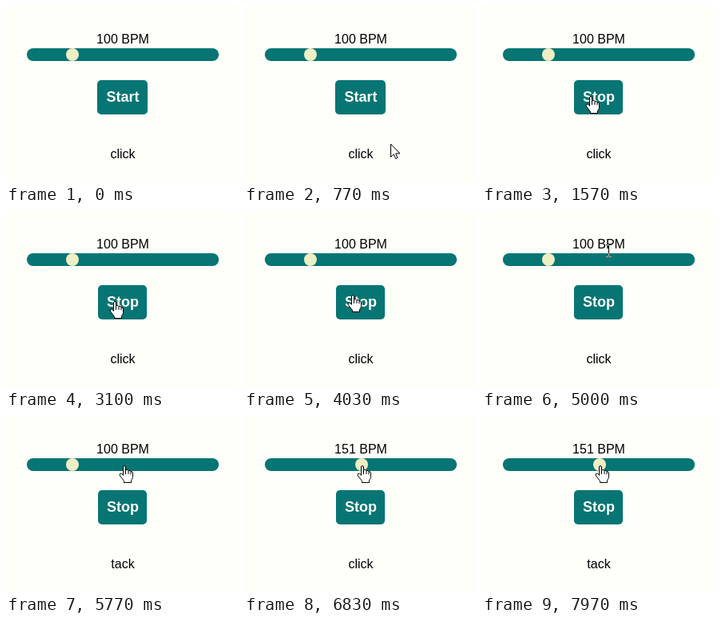
An HTML page that plays this animation: 290 px wide and 222 px high, repeating every 8000 ms.

```html
<!DOCTYPE html>
<html lang="en">
<head>
<meta charset="utf-8">
<title>Metronome</title>
<style>
  html, body { margin: 0; width: 100%; height: 100%; overflow: hidden; background: #fffffa; }
  svg { display: block; width: 290px; height: 222px; background: #fffffa; }
  text { font: 16px "Liberation Sans", Arial, sans-serif; text-anchor: middle; fill: #000; }
  #label { font-size: 18px; font-weight: bold; fill: #fff; }
  .teal { fill: #067573; }
  #thumb { fill: #f0eec4; }
  .pointer { fill: #fff; stroke: #000; stroke-linejoin: round; stroke-linecap: round; }
  #beam { fill: none; stroke: #fff; mix-blend-mode: difference; }
</style>
</head>
<body>
<svg viewBox="0 0 290 222">
  <text id="tempo" x="146" y="47">100 BPM</text>
  <rect class="teal" x="26" y="53" width="240" height="16" rx="8"/>
  <circle id="thumb" cy="61" r="8"/>
  <rect class="teal" id="button" y="93" height="43" rx="5"/>
  <text id="label" x="146" y="120">Start</text>
  <text id="sound" x="146" y="191">click</text>

  <path id="arrow" class="pointer" d="M.5 .5V16.5L4.2 13L6.7 18.5L9 17.5L6.6 12H11.5Z"/>
  <g id="hand" class="pointer">
    <path d="M-1.5 12V2Q-1.5 .5 0 .5T1.5 2V6Q2 5.5 3 5.5Q4.6 5.5 5 6.5Q7.2 6 8 7.5Q10.5 7.5 10.5 10V14.5Q10.3 16.5 8.5 18.5V21.5H-.5V19.5L-5.5 13Q-6.5 11 -5 10Q-3.5 9.5 -1.5 12Z"/>
    <path fill="none" d="M1.5 6V10.5M5 7V10.5M8 8V11"/>
  </g>
  <path id="beam" d="M-3 -7.5H0M1 -7.5H4M.5 -7V7M-3 7.5H0M1 7.5H4"/>
</svg>
<script>
const LOOP = 8000, START = 1350, RETUNE = 6500;
const MIN_BPM = 60, MAX_BPM = 240;
const $ = id => document.getElementById(id);
const cursors = ["arrow", "hand", "beam"].map($);

// time, x, y of the cursor hotspot
const route = [
  [300, 292, 194], [830, 169, 170], [1130, 136, 113], [3600, 136, 113],
  [3950, 136, 105], [4350, 136, 105], [4900, 158, 50], [5200, 158, 50],
  [5600, 148, 62], [LOOP, 148, 62]
];

function cursorAt(t) {
  const next = route.findIndex(stop => stop[0] > t);
  if (next < 1) return route[0].slice(1);
  const [t0, x0, y0] = route[next - 1], [t1, x1, y1] = route[next];
  const p = (t - t0) / (t1 - t0);
  return [x0 + (x1 - x0) * p, y0 + (y1 - y0) * p].map(Math.round);
}

function cursorKind(x, y) {
  const within = (l, t, r, b) => x >= l && x < r && y >= t && y < b;
  if (within(26, 53, 266, 69) || within(114, 93, 177, 136)) return "hand";
  if (within(113, 34, 179, 53) || within(130, 177, 162, 195)) return "beam";
  return "arrow";
}

const beats = (ms, bpm) => Math.floor(Math.max(0, ms) * bpm / 60000);
const beatsAt = t => beats(Math.min(t, RETUNE) - START, 100) + beats(t - RETUNE, 151);

function setText(id, value) {
  if ($(id).textContent !== value) $(id).textContent = value;
}

function draw(t) {
  const playing = t >= START, bpm = t < RETUNE ? 100 : 151;
  const width = playing ? 61 : 63;
  setText("tempo", bpm + " BPM");
  setText("label", playing ? "Stop" : "Start");
  setText("sound", beatsAt(t) % 2 ? "tack" : "click");
  $("button").setAttribute("x", 145.5 - width / 2);
  $("button").setAttribute("width", width);
  $("thumb").setAttribute("cx", Math.floor(34 + 224 * (bpm - MIN_BPM) / (MAX_BPM - MIN_BPM)));

  const [x, y] = cursorAt(t), kind = cursorKind(x, y);
  for (const cursor of cursors) {
    cursor.style.display = cursor.id === kind ? "" : "none";
    cursor.setAttribute("transform", `translate(${x} ${y})`);
  }
}

const began = performance.now();
function tick() {
  draw((performance.now() - began) % LOOP);
  requestAnimationFrame(tick);
}
tick();
</script>
</body>
</html>
```
